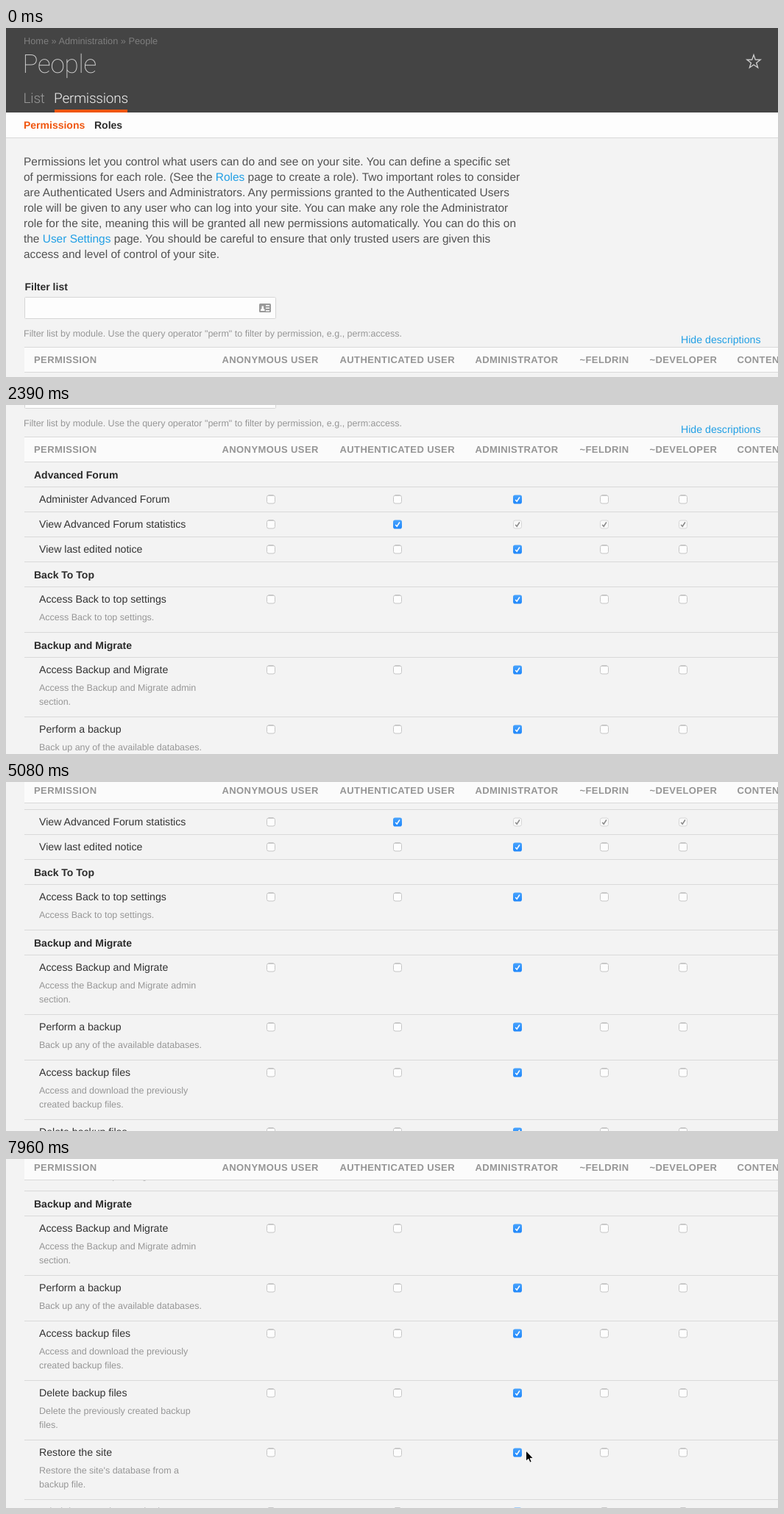
An HTML page that plays this animation: 1049 px wide and 475 px high, repeating every 8000 ms.

```html
<!DOCTYPE html>
<html lang="en">
<head>
<meta charset="utf-8">
<title>Permissions</title>
<style>
  html, body { margin: 0; width: 100%; height: 100%; overflow: hidden; background: #f3f3f3; }
  svg { display: block; width: 1049px; height: 475px; }
  text { font-family: "Liberation Sans", Arial, sans-serif; white-space: pre; text-rendering: geometricPrecision; }
  .crumb { font-size: 12.75px; fill: #7e7e7e; }
  .title, .tab { font-family: Roboto, "Liberation Sans", sans-serif; letter-spacing: -.2px; }
  .title { font-size: 35px; font-weight: 200; fill: #d6d6d6; }
  .tab { font-size: 19px; font-weight: 300; fill: #999; }
  .active { fill: #f2f2f2; }
  .bold { font-size: 14px; font-weight: 700; fill: #2b2b2b; }
  .orange { fill: #f0560f; }
  .intro { font-size: 15.45px; fill: #525252; }
  .small { font-size: 12.5px; fill: #969696; }
  .label { font-size: 14.15px; fill: #333; }
  .head { font-size: 13px; font-weight: 700; letter-spacing: .4px; fill: #959595; }
  .link { fill: #219fe5; }
</style>
</head>
<body>
<svg viewBox="0 0 1049 475">
  <defs>
    <linearGradient id="blue" x2="0" y2="1">
      <stop stop-color="#49a3fc"/><stop offset="1" stop-color="#1f87fb"/>
    </linearGradient>
    <g id="off">
      <rect x="-5.5" y="-5.5" width="11" height="11" rx="2.5" fill="#fdfdfd" stroke="#c6c6c6"/>
      <path d="M-3.5-5.5h7" stroke="#b2b2b2"/>
    </g>
    <path id="tick" d="M-2.8.4-.8 2.7 2.9-3" fill="none" stroke-width="1.5"/>
    <g id="on">
      <rect x="-6" y="-6" width="12" height="12" rx="2.8" fill="url(#blue)"/>
      <use href="#tick" stroke="#fff"/>
    </g>
    <g id="locked">
      <rect x="-5.5" y="-5.5" width="11" height="11" rx="2.5" fill="#f9f9f9" stroke="#d6d6d6"/>
      <use href="#tick" stroke="#888"/>
    </g>
  </defs>
  <rect width="1049" height="475" fill="#f3f3f3"/>
  <g id="page"></g>
  <g id="thead"></g>
  <path id="cursor" d="M706.5 397v14.2l3.3-3 2.2 5 2.3-1-2.1-4.8h4.4z" fill="#000" stroke="#fff"/>
</svg>
<script>
const byId = id => document.getElementById(id);
const text = (x, y, kind, content) => `<text x="${x}" y="${y}" class="${kind}">${content}</text>`;
const rect = (x, y, w, h, fill) => `<rect x="${x}" y="${y}" width="${w}" height="${h}" fill="${fill}"/>`;
const rule = y => rect(25, y, 1024, 1, '#d9d9d9');
const link = s => `<tspan class="link">${s}</tspan>`;

const TABLE_TOP = 434, HEAD_STUCK = -6;
const BOX_X = [360, 532, 695, 813, 920];

const intro = [
  'Permissions let you control what users can do and see on your site. You can define a specific set',
  `of permissions for each role. (See the ${link('Roles')} page to create a role). Two important roles to consider`,
  'are Authenticated Users and Administrators. Any permissions granted to the Authenticated Users',
  'role will be given to any user who can log into your site. You can make any role the Administrator',
  'role for the site, meaning this will be granted all new permissions automatically. You can do this on',
  `the ${link('User Settings')} page. You should be careful to ensure that only trusted users are given this`,
  'access and level of control of your site.'
];

const headings = [
  [38, 'PERMISSION'], [293.5, 'ANONYMOUS USER'], [453.5, 'AUTHENTICATED USER'],
  [637.5, 'ADMINISTRATOR'], [779.5, '~FELDRIN'], [874.5, '~DEVELOPER'], [993.5, 'CONTENT EDITOR']
];

// A leading # marks a section; extra items are description lines.
const rows = [
  ['#Advanced Forum'],
  ['Administer Advanced Forum'],
  ['View Advanced Forum statistics'],
  ['View last edited notice'],
  ['#Back To Top'],
  ['Access Back to top settings', 'Access Back to top settings.'],
  ['#Backup and Migrate'],
  ['Access Backup and Migrate', 'Access the Backup and Migrate admin', 'section.'],
  ['Perform a backup', 'Back up any of the available databases.'],
  ['Access backup files', 'Access and download the previously', 'created backup files.'],
  ['Delete backup files', 'Delete the previously created backup', 'files.'],
  ['Restore the site', "Restore the site's database from a", 'backup file.'],
  ['Administer Backup and Migrate', 'Edit Backup and Migrate profiles,', 'schedules and destinations.']
];

function star(cx, cy, r) {
  const points = Array.from({ length: 10 }, (_, i) => {
    const a = i * Math.PI / 5 - Math.PI / 2, d = i % 2 ? r * .4 : r;
    return `${cx + d * Math.cos(a)},${cy + d * Math.sin(a)}`;
  });
  return `<polygon points="${points.join(' ')}" fill="none" stroke="#d2d2d2" stroke-width="1.3"/>`;
}

function banner() {
  return rect(0, 0, 1049, 115, '#444') +
    text(24, 22, 'crumb', 'Home » Administration » People') +
    text(22.5, 61, 'title', 'People') + star(1016, 46.2, 9.6) +
    text(23.5, 102, 'tab', 'List') + text(65, 102, 'tab active', 'Permissions') +
    rect(66, 111, 99, 4, '#f0560f') +
    rect(0, 115, 1049, 34, '#fdfdfd') + rect(0, 149, 1049, 1, '#d9d9d9') +
    text(24, 137, 'bold orange', 'Permissions') + text(120, 137, 'bold', 'Roles');
}

function filter() {
  return text(25.5, 357, 'bold', 'Filter list') +
    '<rect x="25.5" y="366.5" width="341" height="29" rx="1" fill="#fdfdfd" stroke="#d6d6d6"/>' +
    '<rect x="344" y="375" width="16" height="12" rx="1.5" fill="#999"/>' +
    '<path d="M346 385v-2l1.5-1v-3.5h2.5V382l1.5 1v2zM353 377h5v1.5h-5zM353 380.5h5v1.5h-5zM353 384h5v1.5h-5z" fill="#fdfdfd"/>' +
    text(24, 420, 'small', 'Filter list by module. Use the query operator "perm" to filter by permission, e.g., perm:access.') +
    text(917, 429, 'label link', 'Hide descriptions');
}

function boxState(label, column) {
  if (!label.includes('statistics')) return column === 2 ? 'on' : 'off';
  return ['off', 'on', 'locked'][Math.min(column, 2)];
}

function table() {
  let y = TABLE_TOP + 34, out = '';
  for (const [label, ...notes] of rows) {
    out += rule(y);
    if (label[0] === '#') {
      out += text(38, y + 23, 'bold', label.slice(1));
    } else {
      out += text(45, y + 22, 'label', label);
      notes.forEach((note, i) => out += text(45, y + 46 + 19 * i, 'small', note));
      BOX_X.forEach((x, i) => out += `<use href="#${boxState(label, i)}" x="${x}" y="${y + 17.5}"/>`);
    }
    y += notes.length ? 43 + 19 * notes.length : 34;
  }
  return out + rule(y);
}

byId('page').innerHTML = banner() +
  intro.map((line, i) => text(24, 187 + 21 * i, 'intro', line)).join('') +
  filter() + table();
byId('thead').innerHTML = rect(25, 0, 1024, 34, '#fbfbfb') + rule(0) + rule(34) +
  headings.map(([x, s]) => text(x, 22, 'head', s)).join('');

const easeIn = power => x => x ** power;
const easeOut = power => x => 1 - (1 - x) ** power;
const easeInOut = x => x * x * (3 - 2 * x);

// Each wheel gesture moves the page in discrete steps to a new offset.
const STEP = 117.5;
const gestures = [
  { start: 570, steps: 1, to: 10, ease: easeInOut },
  { start: 720, steps: 13, to: 333, ease: easeIn(1.42) },
  { start: 2270, steps: 11, to: 477, ease: easeOut(2.57) },
  { start: 4470, steps: 4, to: 490, ease: easeIn(1.35) },
  { start: 4970, steps: 3, to: 536, ease: easeIn(1.5) },
  { start: 5350, steps: 4, to: 676, ease: easeOut(1.3) },
  { start: 5910, steps: 9, to: 731, ease: easeInOut },
  { start: 7010, steps: 1, to: 732, ease: easeInOut },
  { start: 7150, steps: 4, to: 657, ease: easeInOut }
];

function scrollAt(t) {
  let offset = 0;
  for (const { start, steps, to, ease } of gestures) {
    if (t < start) break;
    const step = Math.min(steps, Math.floor((t - start) / STEP) + 1);
    offset += (to - offset) * ease(step / steps);
  }
  return Math.round(offset);
}

function draw(t) {
  const scroll = scrollAt(t);
  byId('page').setAttribute('transform', `translate(0 ${-scroll})`);
  byId('thead').setAttribute('transform', `translate(0 ${Math.max(TABLE_TOP - scroll, HEAD_STUCK)})`);
  byId('cursor').setAttribute('visibility', t >= 7960 ? 'visible' : 'hidden');
}

const begin = performance.now();
function tick() {
  draw((performance.now() - begin) % 8000);
  requestAnimationFrame(tick);
}
tick();
</script>
</body>
</html>
```
